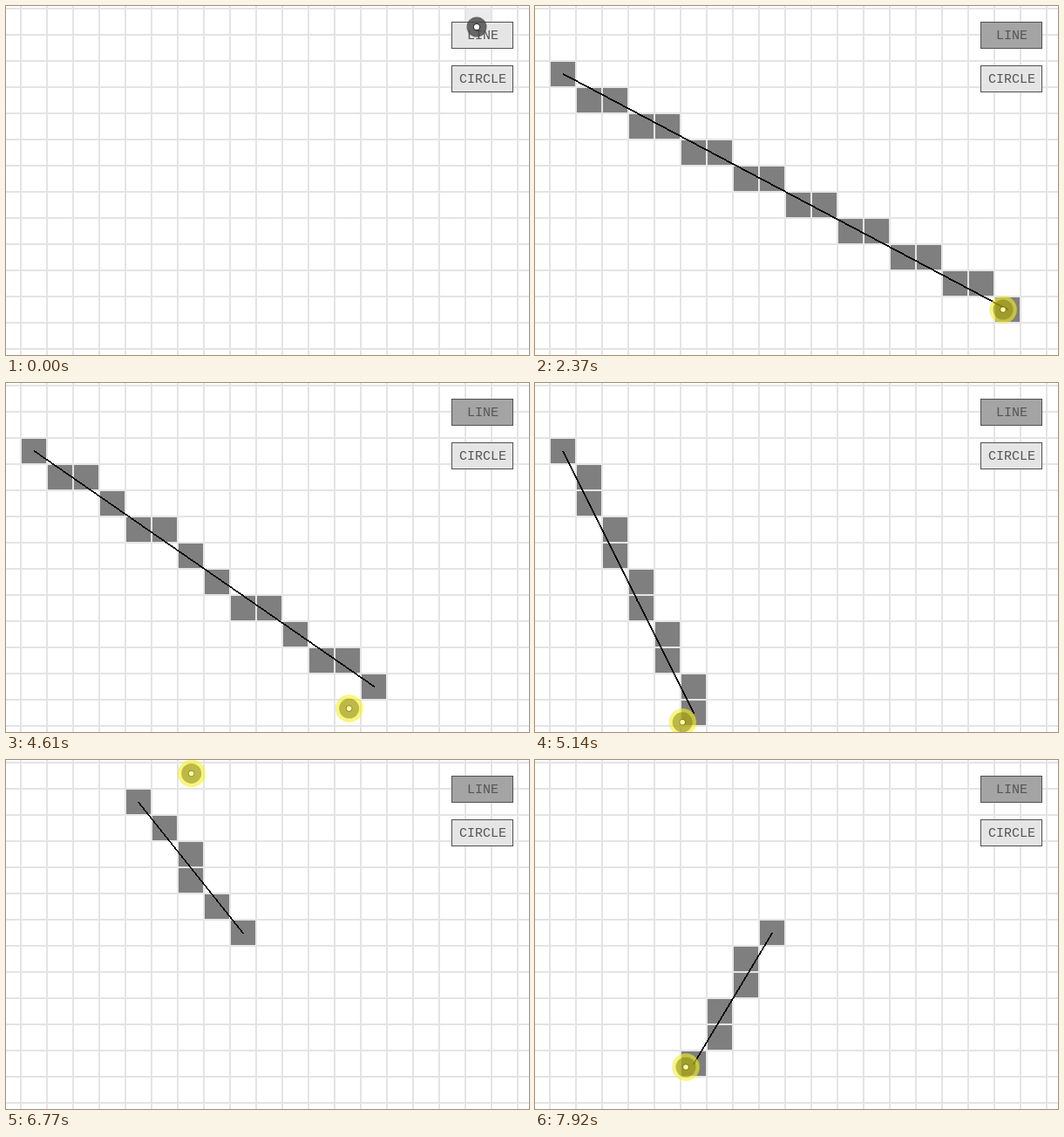
An HTML page with a canvas for the animation above (8 s loop, 600 px wide and 400 px high).

```html
<!DOCTYPE html>
<html lang="en">
<head>
<meta charset="utf-8">
<title>Grid line drawing</title>
<style>
html, body { margin: 0; width: 100%; height: 100%; overflow: hidden; background: #fff; }
canvas { display: block; }
</style>
</head>
<body>
<canvas id="stage" width="600" height="400"></canvas>
<script>
const ctx = document.getElementById('stage').getContext('2d');
const LOOP = 8000, FPS = 13, LAST = 103;
const CELL = 30, LEFT = 17, TOP = 3;

const smooth = t => (1 - Math.cos(Math.PI * t)) / 2;
const easeOut = power => t => 1 - (1 - t) ** power;

// Each stroke is a Bezier curve that starts where the previous one ended
const home = [540, 24];
const strokes = [
  { from: 0, to: 1, ease: smooth, curve: [[541, 36]] },
  { from: 8, to: 18, ease: smooth, curve: [[150, 112], [33, 79]] },
  { from: 18, to: 31, ease: smooth, curve: [[520, 355], [537, 348]] },
  { from: 39, to: 49, ease: smooth, curve: [[541, 133]] },
  { from: 52, to: 68, ease: easeOut(1.64), curve: [[600, 300], [450, 415], [160, 388]] },
  { from: 71, to: 79, ease: easeOut(1.5), curve: [[290, 290], [400, 215], [256, 200]] },
  { from: 79, to: 82, ease: smooth, curve: [[40, 220], [20, 280]] },
  { from: 82, to: 96, ease: easeOut(1.2), curve: [[-40, -10], [440, -100], [547, 159]] },
  { from: 96, to: LAST, ease: smooth, curve: [[640, 380], [300, 365], [173, 352]] }
];
const presses = [{ from: 6, to: 7 }, { from: 18, to: 71 }, { from: 79, to: LAST }];
const drags = [
  { from: 19, to: 71, start: [0, 2] },
  { from: 80, to: LAST, start: [8, 6] }
];
const activeAt = (spans, step) => spans.find(s => step >= s.from && step <= s.to);

function bezier(points, u) {
  if (points.length === 1) return points[0];
  const [x, y] = bezier(points.slice(0, -1), u);
  const [x2, y2] = bezier(points.slice(1), u);
  return [x + (x2 - x) * u, y + (y2 - y) * u];
}

function pointer(step) {
  let pos = home;
  for (const { from, to, ease, curve } of strokes) {
    if (step < from) break;
    const t = Math.min(1, (step - from) / (to - from));
    pos = bezier([pos, ...curve], ease(t));
  }
  return pos;
}

const cellAt = ([x, y]) => [Math.floor((x - LEFT) / CELL), Math.floor((y - TOP) / CELL)];
const center = ([col, row]) => [LEFT + 15 + col * CELL, TOP + 15 + row * CELL];

// Visits every step of the longer axis between two points
function trace([x, y], [x2, y2], visit) {
  const dx = x2 - x, dy = y2 - y;
  const n = Math.max(Math.abs(dx), Math.abs(dy));
  for (let i = 0; i <= n; i++) {
    const u = n ? i / n : 0;
    visit(Math.round(x + dx * u), Math.round(y + dy * u));
  }
  return Math.abs(dx) >= Math.abs(dy);
}

function fillCell(col, row, color) {
  ctx.fillStyle = color;
  ctx.fillRect(LEFT + 1 + col * CELL, TOP + 1 + row * CELL, 28, 28);
}

function drawGrid() {
  ctx.fillStyle = '#fff';
  ctx.fillRect(0, 0, 600, 400);
  ctx.fillStyle = '#e4e4e4';
  for (let x = LEFT - 1; x < 600; x += CELL) ctx.fillRect(x, 0, 2, 400);
  for (let y = TOP - 1; y < 400; y += CELL) ctx.fillRect(0, y, 600, 2);
}

function drawLine(start, end) {
  trace(start, end, (col, row) => fillCell(col, row, '#7f7f7f'));
  const flat = Math.abs(end[0] - start[0]) >= Math.abs(end[1] - start[1]);
  ctx.fillStyle = '#000';
  trace(center(start), center(end), (x, y) =>
    flat ? ctx.fillRect(x, y - 1, 1, 2) : ctx.fillRect(x - 1, y, 2, 1));
}

function drawButton(label, y, active) {
  ctx.fillStyle = active ? '#a4a4a4' : '#e5e5e5';
  ctx.strokeStyle = '#505050';
  ctx.lineWidth = 1;
  ctx.fillRect(511, y, 71, 31);
  ctx.strokeRect(511.5, y + 0.5, 70, 30);
  ctx.fillStyle = '#555';
  ctx.font = '15px "Liberation Mono", monospace';
  ctx.textAlign = 'center';
  ctx.fillText(label, 547, y + 20);
}

function disc(x, y, r, color) {
  ctx.fillStyle = color;
  ctx.beginPath();
  ctx.arc(x, y, r, 0, Math.PI * 2);
  ctx.fill();
}

function drawPointer([x, y], pressed) {
  if (pressed) {
    disc(x, y, 15.8, 'rgba(245,240,40,.6)');
    disc(x, y, 11.5, 'rgba(110,105,0,.43)');
    disc(x, y, 3.8, 'rgba(95,90,0,.4)');
    disc(x, y, 2.8, '#fffbb0');
  } else {
    disc(x, y, 11.5, 'rgba(70,70,70,.8)');
    disc(x, y, 4.2, '#333');
    disc(x, y, 3.1, '#fff');
  }
}

function draw(now) {
  const step = Math.min(LAST, Math.floor(((now % LOOP) + 22) * FPS / 1000));
  // Cells trail the pointer by one step
  const cell = cellAt(pointer(Math.max(0, step - 1)));
  const drag = activeAt(drags, step);
  drawGrid();
  if (drag) drawLine(drag.start, cell);
  else fillCell(...cell, '#ebebeb');
  drawButton('LINE', 18, step >= 7);
  drawButton('CIRCLE', 68, false);
  drawPointer(pointer(step), Boolean(activeAt(presses, step)));
}

const begin = performance.now();
function tick() {
  draw(performance.now() - begin);
  requestAnimationFrame(tick);
}
tick();
</script>
</body>
</html>
```
